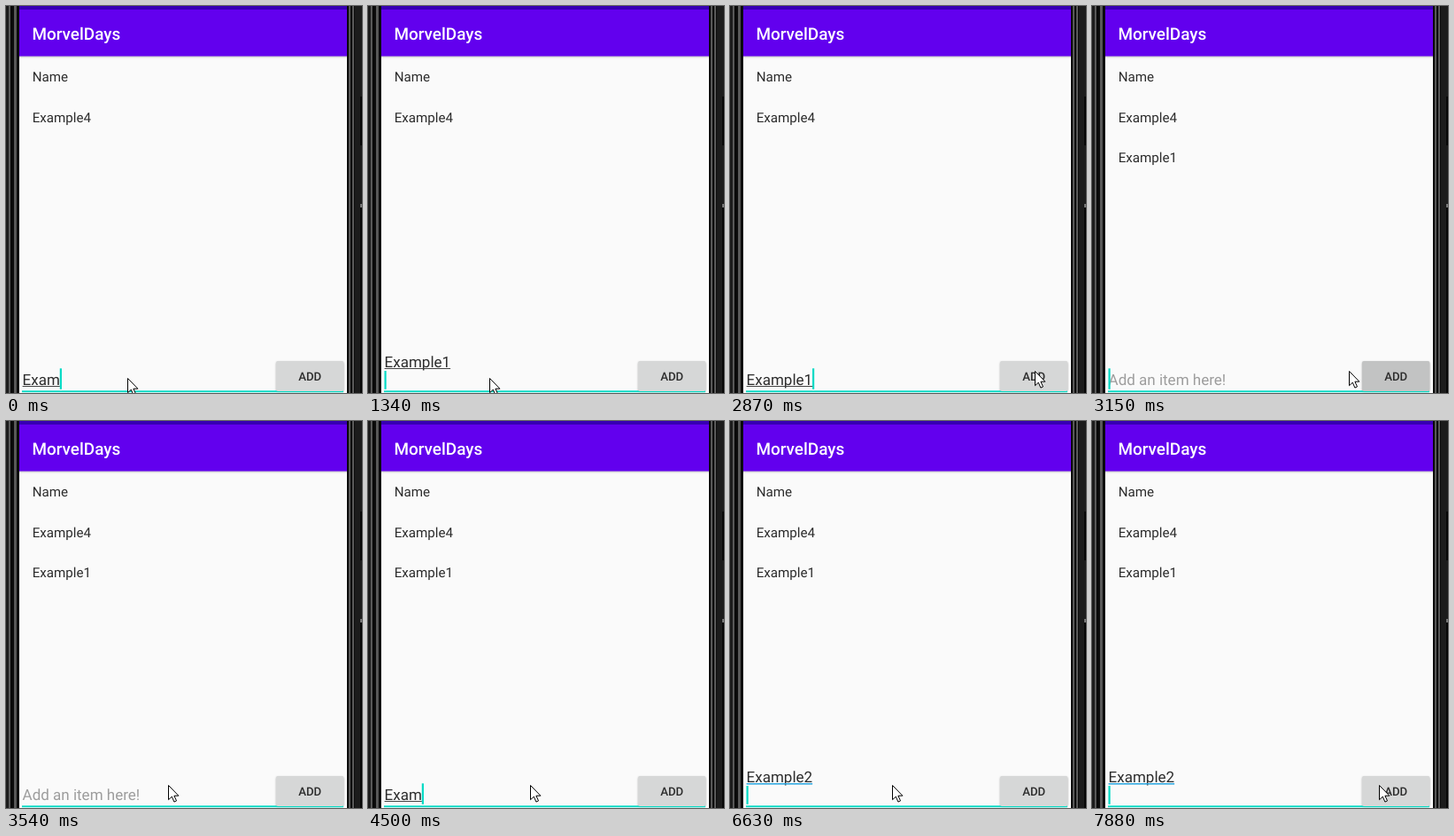
Write an HTML page that moves like this. It is 402 px wide and 436 px high and loops after 8 s.

```html
<!DOCTYPE html>
<html lang="en">
<head>
<meta charset="utf-8">
<title>To-do list</title>
<style>
  html, body { margin: 0; width: 100%; height: 100%; overflow: hidden; background: #000; }
  svg { display: block; width: 402px; height: 436px; }
  text { font-family: Roboto, "Noto Sans", sans-serif; fill: #2c2c2c; text-rendering: geometricPrecision; }
  .medium { font-weight: 500; }
  .item { font-size: 15.15px; }
  .field { font-size: 17px; }
</style>
</head>
<body>
<svg viewBox="0 0 402 436" xmlns="http://www.w3.org/2000/svg">
  <defs>
    <linearGradient id="shade" x2="0" y2="1">
      <stop offset="0" stop-opacity=".2"/>
      <stop offset="1" stop-opacity="0"/>
    </linearGradient>
    <filter id="soft" x="-10%" y="-20%" width="120%" height="140%">
      <feGaussianBlur stdDeviation=".8"/>
    </filter>
  </defs>

  <!-- phone body -->
  <rect width="402" height="436" fill="#0a0a0a"/>
  <path d="M0 0h3v436h-3zM394 0h8v436h-8z" fill="#1c1c1c"/>
  <path d="M3 0h2v436h-2zM9 0h3v436h-3zM387 0h2v436h-2zM391 0h2v436h-2z" fill="#585858"/>
  <path d="M400 102h2v55h-2zM400 227h2v209h-2z" fill="#050505"/>
  <path d="M400 223h2v4h-2z" fill="#777"/>

  <!-- screen -->
  <rect x="15" width="370" height="436" fill="#fafafa"/>
  <rect x="15" width="370" height="4.5" fill="#3700b3"/>
  <rect x="15" y="4" width="370" height="52.6" fill="#6200ee"/>
  <rect x="15" y="56.6" width="370" height="2.4" fill="url(#shade)"/>
  <text class="medium" x="29.5" y="38" font-size="18.9" style="fill:#fff">MorvelDays</text>

  <g id="list"></g>

  <!-- input row -->
  <text id="hint" class="field" x="18.6" y="426.5" style="fill:#9d9d9d">Add an item here!</text>
  <text id="entry" class="field" x="18.6"></text>
  <rect id="line" x="18.6"/>
  <rect id="caret" width="2.2" fill="#03dac5"/>

  <rect x="305" y="401" width="76.3" height="33.5" rx="2" fill-opacity=".3" filter="url(#soft)"/>
  <rect x="18" y="433.3" width="363" height="1.9" fill="#03dac5"/>
  <rect id="button" x="305" y="400" width="76.3" height="34" rx="2"/>
  <text class="medium" x="343.2" y="422.3" font-size="13.2" text-anchor="middle">ADD</text>

  <path id="mouse" d="M0 0V16.2L3.8 12.7L6.4 18.6L9 17.4L6.4 11.7H11.4Z"
        fill="#fff" stroke="#000" stroke-width="1"/>
</svg>
<script>
  const LOOP = 8000, BASE = 426.5, LINE_HEIGHT = 20;
  const $ = id => document.getElementById(id);

  const items = ["Name", "Example4", "Example1"].map((label, i) => {
    const t = document.createElementNS("http://www.w3.org/2000/svg", "text");
    t.setAttribute("class", "item");
    t.setAttribute("x", 29.7);
    t.setAttribute("y", 85.4 + 45.3 * i);
    t.textContent = label;
    $("list").append(t);
    return t;
  });

  // Each step lists only what changes; "\n" marks a second, empty line.
  const steps = [
    [0, { text: "Exam", line: "dark", caret: true, mouse: [137.5, 419.5], count: 2, pressed: false }],
    [120, { text: "Examp" }],
    [260, { text: "Exampl" }],
    [400, { text: "Example" }],
    [820, { caret: false }],
    [1090, { text: "Example1", caret: true }],
    [1340, { text: "Example1\n" }],
    [1630, { line: "" }],
    [2050, { caret: false }],
    [2330, { text: "Example1", line: "dark", caret: true }],
    [2470, { mouse: [178.5, 418.5] }],
    [2600, { mouse: [262.5, 415.5] }],
    [2740, { mouse: [330.5, 412.5] }],
    [2870, { mouse: [344.5, 411.5] }],
    [2990, { pressed: true }],
    [3130, { text: "", count: 3, mouse: [290.5, 411.5] }],
    [3290, { pressed: false, mouse: [183.5, 410.5] }],
    [3540, { caret: false }],
    [4100, { text: "E", caret: true }],
    [4220, { text: "Ex" }],
    [4500, { text: "Exam" }],
    [4620, { text: "Examp" }],
    [4780, { text: "Example" }],
    [4930, { text: "Example ", line: "" }],
    [5510, { caret: false }],
    [5800, { text: "Example", line: "dark", caret: true }],
    [6080, { text: "Example2" }],
    [6210, { text: "Example2 ", line: "blue" }],
    [6630, { text: "Example2\n" }],
    [7160, { caret: false }],
    [7430, { caret: true }],
    [7580, { mouse: [222.5, 416.5] }],
    [7730, { mouse: [290.5, 415.5] }],
    [7880, { mouse: [324.5, 410.5] }]
  ];

  function set(el, attrs) {
    for (const key in attrs) el.setAttribute(key, attrs[key]);
  }

  function show(el, on) {
    el.style.display = on ? "" : "none";
  }

  function stateAt(time) {
    return Object.assign({}, ...steps.filter(s => s[0] <= time).map(s => s[1]));
  }

  function draw(time) {
    const { text, line, caret, mouse, count, pressed } = stateAt(time);
    const wrapped = text.endsWith("\n");
    const word = text.trim();
    const base = wrapped ? BASE - LINE_HEIGHT : BASE;

    items.forEach((item, i) => show(item, i < count));
    show($("hint"), !text);
    $("entry").textContent = word;
    set($("entry"), { y: base });
    const width = word ? $("entry").getComputedTextLength() : 0;

    show($("line"), word && line);
    set($("line"), {
      y: base + 1.5, width,
      height: line === "blue" ? 1.6 : 1,
      fill: line === "blue" ? "#33a9e0" : "#444"
    });

    const space = text.endsWith(" ") ? 4.2 : 0;
    const top = wrapped ? 411 : 408.3;
    show($("caret"), caret);
    set($("caret"), {
      x: 18.5 + (wrapped ? 0 : width + space),
      y: top, height: 431.8 - top
    });

    set($("button"), { fill: pressed ? "#c2c3c3" : "#d6d7d7" });
    set($("mouse"), { transform: `translate(${mouse})` });
  }

  function tick() {
    draw(performance.now() % LOOP);
    requestAnimationFrame(tick);
  }
  tick();
</script>
</body>
</html>
```
